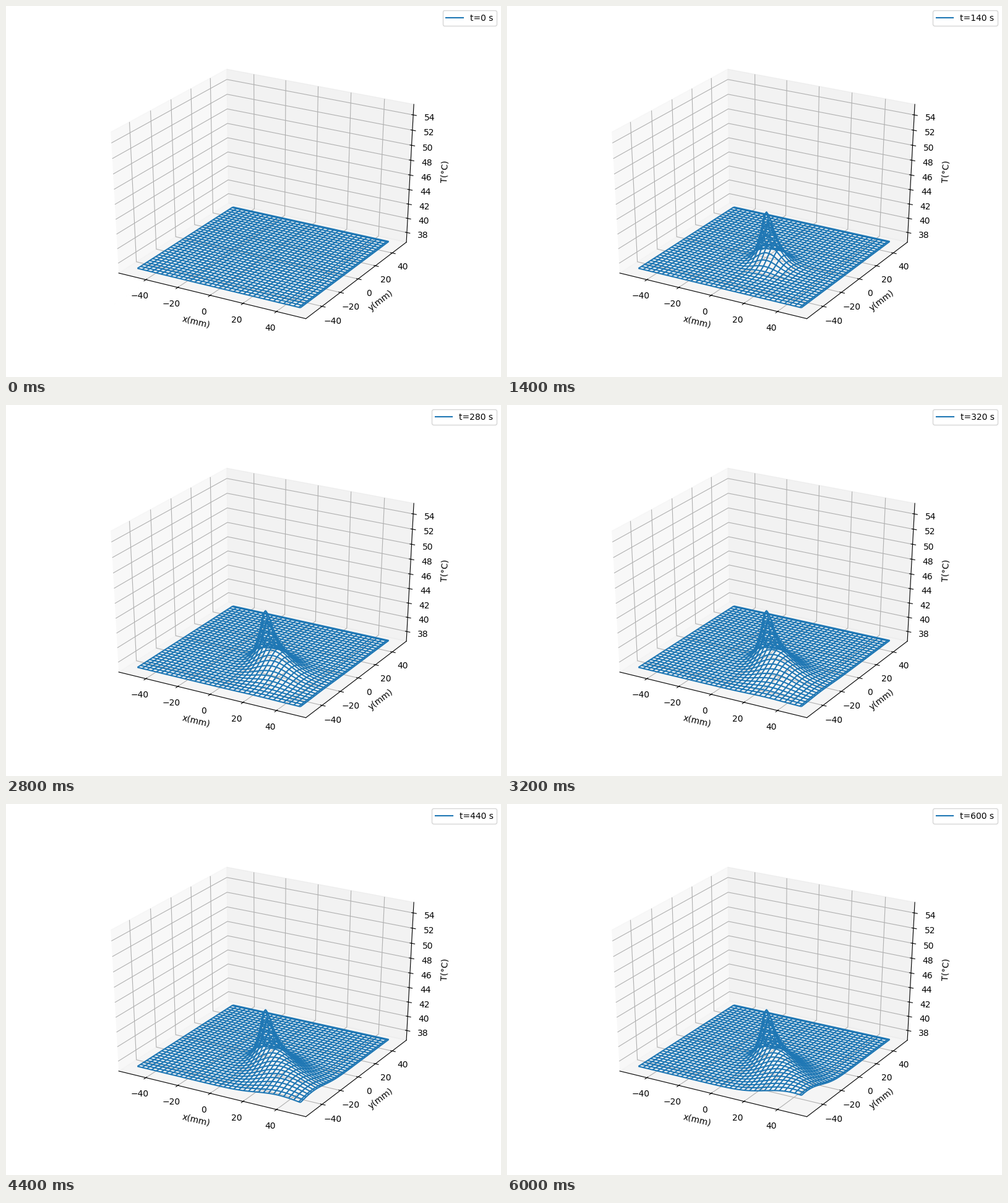
Animation of 800 by 600 pixels, one loop 6.1 s. Source, as a matplotlib script:

```python
import math

import matplotlib.pyplot as plt
import numpy as np
from matplotlib.animation import FuncAnimation

FRAMES = 61
STEP_S = 10          # simulated seconds per frame
SUBSTEPS = 20
BASE_T = 37.0        # tissue temperature, °C
DIFFUSIVITY = 0.19   # mm²/s
FLOW = 0.1           # mm/s along +x and -y
POWER = 8.48         # °C·mm²/s
SPOT_VAR = 4.0       # variance of the heated spot, mm²
MARGIN = 25 / 24     # the panes reach a little past the limits

axis_mm = np.linspace(-50, 50, 101)
X, Y = np.meshgrid(axis_mm, axis_mm)


def heat_fields():
    """Temperature at every frame: drifting, spreading Gaussian puffs summed."""
    dt = STEP_S / SUBSTEPS
    rise = np.zeros_like(X)
    fields = [BASE_T + rise]
    for n in range((FRAMES - 1) * SUBSTEPS):
        age = (n + 0.5) * dt
        var = SPOT_VAR + 2 * DIFFUSIVITY * age
        gx = np.exp(-(axis_mm - FLOW * age) ** 2 / (2 * var))
        gy = np.exp(-(axis_mm + FLOW * age) ** 2 / (2 * var))
        rise = rise + POWER * dt / (2 * math.pi * var) * np.outer(gy, gx)
        if (n + 1) % SUBSTEPS == 0:
            fields.append(BASE_T + rise)
    return fields


def padded(low, high):
    mid, half = (low + high) / 2, (high - low) / 2 * MARGIN
    return mid - half, mid + half


fields = heat_fields()

fig = plt.figure(figsize=(8, 6), dpi=100)
ax = fig.add_subplot(projection="3d")
# Fill the whole subplot area instead of a centred square.
ax.apply_aspect = lambda position=None: None
ax.set_box_aspect((1, 1, 1), zoom=math.sqrt(3) / 1.8294640721620434)
ax.view_init(elev=30, azim=-60)

ax.set_xlim(*padded(-55, 55))
ax.set_ylim(*padded(-55, 55))
ax.set_zlim(*padded(37, 55))
ax.set_xticks(range(-40, 41, 20))
ax.set_yticks(range(-40, 41, 20))
ax.set_zticks(range(38, 55, 2))
ax.set_xlabel("x(mm)")
ax.set_ylabel("y(mm)")
ax.set_zlabel("T(°C)")

key = plt.Line2D([], [], color="C0", linewidth=1.5)
legend = fig.legend([key], ["t=0 s"], loc="upper right")
state = {"wire": None}


def update(i):
    if state["wire"] is not None:
        state["wire"].remove()
    state["wire"] = ax.plot_wireframe(X, Y, fields[i], rstride=3, cstride=3,
                                      color="C0", linewidth=1.5)
    legend.get_texts()[0].set_text(f"t={i * STEP_S} s")
    return []


anim = FuncAnimation(fig, update, frames=FRAMES, interval=100, repeat=True)
plt.show()
```
